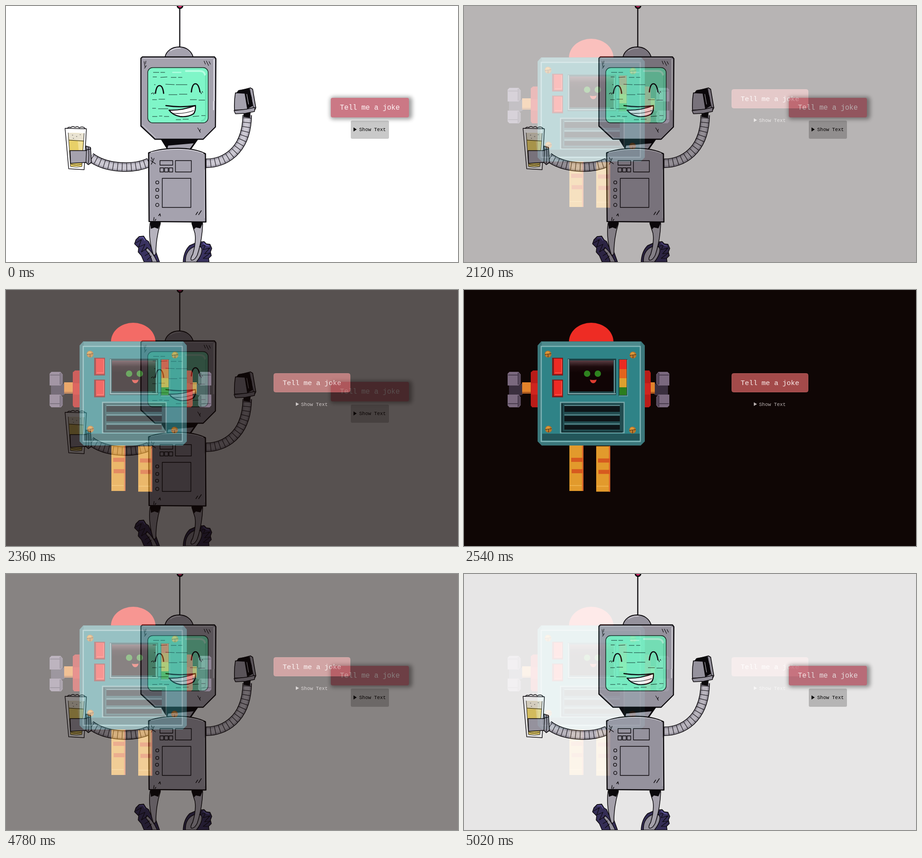
An HTML page that plays this animation: 995x563 px, repeating every 5.08 s.

```html
<!DOCTYPE html>
<html lang="en">
<head>
<meta charset="utf-8">
<title>Joke robots</title>
<style>
  html, body { margin: 0; width: 100%; height: 100%; overflow: hidden; background: #fff; }
  svg { display: block; width: 995px; height: 563px; }
  text { font-family: "Courier New", "Liberation Mono", monospace; text-anchor: middle; }

  /* Ten-percent fade steps of 60 ms, with a long hold at each end. */
  .night { animation: fade 5080ms infinite; }
  @keyframes fade {
    0%      { opacity: 0; animation-timing-function: step-end; }
    39.37%  { opacity: 0; animation-timing-function: steps(10, start); }
    51.181% { opacity: 1; animation-timing-function: step-end; }
    89.37%  { opacity: 1; animation-timing-function: steps(9, start); }
    100%    { opacity: .1; }
  }

  .ink { fill: none; stroke: #0b090d; stroke-linecap: round; stroke-linejoin: round; }
  .metal { fill: #a5a2ae; stroke: #0b090d; stroke-linejoin: round; }
  .shine { fill: none; stroke: #e3e1e9; stroke-linecap: round; }
</style>
</head>
<body>
<svg viewBox="0 0 995 563">
  <defs>
    <filter id="shadow" x="-20%" y="-60%" width="140%" height="220%"><feGaussianBlur stdDeviation="5"/></filter>
    <filter id="soft" x="0" y="0" width="995" height="563" filterUnits="userSpaceOnUse"><feGaussianBlur stdDeviation=".7"/></filter>
    <filter id="smooth" x="0" y="0" width="995" height="563" filterUnits="userSpaceOnUse"><feGaussianBlur stdDeviation=".45"/></filter>
    <linearGradient id="glare" x2="0" y2="1">
      <stop offset="0" stop-color="#5a3d43"/><stop offset=".2" stop-color="#1d0b0d"/><stop offset=".4" stop-color="#100405"/>
    </linearGradient>
    <g id="arms" fill="none">
      <path d="M315 344C280 360 220 358 186 332"/>
      <path d="M440 346C480 346 530 320 531 240"/>
    </g>
    <g id="screw">
      <circle r="7.5" fill="#b9752a"/><circle cx="-1" cy="-1.5" r="4.5" fill="#dc9838"/>
      <path d="M-7 1L7 -1M0 0V7" stroke="#5e3a18" stroke-width="1.6"/>
    </g>
    <g id="claw">
      <path d="M99 208H124L129 204V230L124 232H99Z" fill="#3b2f3f"/>
      <path d="M100 180H120L125 186V206L120 210H96V184Z" fill="#7b697f"/>
      <path d="M96 230H120L125 236V253L121 258H100L96 254Z" fill="#7b697f"/>
      <path d="M119 182V208M119 232V257M97 187H119M97 250H119" stroke="#493b4e" stroke-width="2"/>
      <path d="M120 181L125 187V206L120 209ZM120 231L125 237V252L120 257Z" fill="#594a5d"/>
    </g>
    <g id="leg">
      <path d="M0 0H31V100H0Z" fill="#e29a2c"/>
      <path d="M28 0H31V100H28Z" fill="#d9652a"/>
      <path d="M4 27H31V36H4ZM5 52H31V61H5Z" fill="#d75a1f"/>
      <path d="M1 88H27" stroke="#eeb14a" stroke-width="2"/>
    </g>
    <g id="lamp">
      <path d="M0 0H24V39H0Z" fill="#7c1c1b"/><path d="M4 2H22V36H4Z" fill="#ee2a24"/>
      <path d="M6 33H21V4" fill="none" stroke="#ff5a4c" stroke-width="1.5"/>
    </g>
  </defs>

  <g class="day">
    <rect width="995" height="563" fill="#fff"/>
    <g filter="url(#smooth)">

      <!-- antenna and dome -->
      <path class="ink" d="M382.5 4V91" stroke-width="2.4"/>
      <circle cx="383" cy="-1" r="7.5" fill="#0b090d"/><circle cx="383" cy="-1" r="4.5" fill="#d8276b"/>
      <path class="metal" d="M350 112C353 99 365 90 381 90S408 99 412 112Z" stroke-width="1.8"/>
      <path class="shine" d="M362 99Q371 92 384 93" stroke-width="1.5"/>

      <!-- legs and shoes -->
      <g stroke="#0b090d" stroke-width="1.5" stroke-linejoin="round">
        <path d="M283 523L286 514L293 507L303 506L308 514L314 518L318 528L330 541L338 563H304L298 549L291 541L292 532Z" fill="#39325f"/>
        <path d="M310 531Q323 541 333 563H322Q318 546 308 537Z" fill="#a5a2ae"/>
        <path d="M390 563Q391 540 404 527L420 520L436 518L441 523L449 524L453 533L450 541L452 549L446 555L447 563Z" fill="#39325f"/>
        <path d="M395 563Q394 542 409 532Q425 523 431 533Q433 546 419 563Z" fill="#a5a2ae"/>
        <path d="M317 478H340Q330 509 330 544Q326 553 323 543Q313 510 317 478Z" fill="#b5b2bd"/>
        <path d="M409 478H433Q432 515 421 548Q415 560 408 559Q405 556 411 546Q419 520 416 500Z" fill="#b5b2bd"/>
      </g>
      <path class="ink" d="M286 521L298 514L292 530L306 524L298 541L312 532M306 549L316 543M311 558L320 550M430 522L426 529L439 526L434 536L449 532L437 545L450 543L434 555L446 555" stroke-width="1.2"/>
      <path d="M293 510L302 509L306 516M434 521L440 526L447 528" fill="none" stroke="#675daa" stroke-width="2"/>
      <path d="M317 475H341L335 490L327 487L319 490ZM408 475H434L428 489L418 487L413 492Z" fill="#0b090d"/>

      <!-- arms -->
      <use href="#arms" stroke="#0b090d" stroke-width="20.5"/>
      <use href="#arms" stroke="#a9a6b2" stroke-width="17.5"/>
      <use href="#arms" stroke="#cbc8d2" stroke-width="11"/>
      <use href="#arms" stroke="#2a272e" stroke-width="17.5" stroke-dasharray="1.3 8.7"/>

      <!-- glass and left hand -->
      <path class="ink" d="M135 270Q136 265 143 267Q147 263 152 267Q158 263 161 268Q169 263 175 270" stroke-width="1.4"/>
      <path d="M130 269L177 270L172 360L138 358Z" fill="#fff" stroke="#17151a" stroke-width="1.5" stroke-linejoin="round"/>
      <path d="M137 279L172 280L167 353L142 353Z" fill="#e8d068"/>
      <path d="M137 279L172 280L171 296L139 294Z" fill="#e9e3d2"/>
      <path d="M158 297L169 298L168 318H160Z" fill="#f2e196"/>
      <path class="ink" d="M137 279L142 353Q155 356 167 353L172 280M139 295L171 297M146 284H147M155 287H156M163 283H164M148 291H149M143 348Q155 352 166 348" stroke-width=".9"/>
      <path class="metal" d="M141 318H177L176 308L186 311L188 344L181 349L176 344L142 346Z" stroke-width="1.6"/>
      <path class="ink" d="M177 318L176 345M181 311Q184 328 181 346M176 317L187 314" stroke-width="1.3"/>

      <!-- right hand -->
      <path d="M523 231L539 230L537 246L523 244Z" fill="#0b090d"/>
      <path class="metal" d="M511 187L538 180L543 183L550 224L546 232L529 231Z" stroke-width="1.6"/>
      <path d="M512 185L535 181L541 201L543 220L532 226L525 192L507 191Z" fill="#0b090d"/>
      <path class="ink" d="M536 181Q539 202 545 224" stroke-width="1.3"/>
      <path class="metal" d="M505 191L526 192L532 228L503 229Q502 208 505 191Z" stroke-width="1.6"/>
      <path class="metal" d="M502 230L529 227L548 223L547 232L527 236L505 237Z" stroke-width="1.4"/>
      <path class="shine" d="M530 194L534 216" stroke-width="1"/>

      <!-- neck -->
      <path d="M340 292H424L407 316H355Z" fill="#0b090d"/>
      <path d="M357 307L413 302L404 315H355Z" fill="#a5a2ae"/>

      <!-- body -->
      <path class="metal" d="M314 323Q340 313 378 313Q415 313 439 325L440 475L315 474Z" stroke-width="2.6"/>
      <path class="shine" d="M319 322Q345 315 378 315Q412 315 434 324" stroke-width="1.5"/>
      <path class="shine" d="M437 360V466" stroke-width=".8"/>
      <g class="ink" stroke-width="1.4">
        <rect x="339" y="340" width="28" height="10"/><rect x="373" y="340" width="35" height="25"/>
        <rect x="339" y="356" width="8" height="9"/><rect x="349" y="356" width="8" height="9"/><rect x="359" y="356" width="8" height="9"/>
        <rect x="344" y="379" width="63" height="64"/>
        <circle cx="333" cy="388" r="3.4"/><circle cx="333" cy="404.500" r="3.4"/><circle cx="332.500" cy="419.500" r="3.4"/><circle cx="333" cy="437.500" r="3.6"/>
        <path d="M319 340L329 347M320 348L326 335M322 338L320 333M336 461L339 457L340 462M418 459L422 453M424 459L430 450M325 472L326 465M328 472L330 469"/>
      </g>

      <!-- head -->
      <path class="metal" d="M300 112H459L462 116L461 266L434 293H328L297 264V115Z" stroke-width="2.4"/>
      <path class="shine" d="M302 115H455" stroke-width="1"/>
      <path class="shine" d="M458 118V208M457 210V228" stroke-width="2.5"/>
      <path class="shine" d="M301 262L329 289" stroke-width="1"/>
      <path class="ink" d="M304 122L306 134M308 121L307 127M305 137L309 131M436 121L439 128M441 121L446 131M447 122L450 128M422 268L428 278M428 271L426 276" stroke-width="1.1"/>
      <rect x="312" y="135.500" width="133" height="121.500" rx="11" fill="#7ff6c8" stroke="#14251f" stroke-width="1.5"/>
      <path d="M440 150V240Q440 251 429 253" fill="none" stroke="#6be0b3" stroke-width="3"/>
      <path d="M396 143H427Q436 143 438 151" fill="none" stroke="#b5ffe2" stroke-width="4" stroke-linecap="round"/>
      <path d="M366 146H386" stroke="#b0ffe0" stroke-width="2.5"/>
      <path d="M324 146H337M340 146H350M323 156H332M340 157L355 156M363 157H375M379 157H388M326 173H329M351 172L371 173M374 173H399M322 206H332M336 205H350M358 195H377M381 194H399M405 206H420M424 207H438M322 225H330M335 226H357M322 243H333M337 242H344M348 243H359M411 243L425 242M430 241H439M374 250H385M389 249H402" stroke="#12332a" stroke-width="1.1"/>
      <path class="ink" stroke-width="2.7" d="M329 192Q331 175 338 175T347 192M408 189Q410 171 417 171T427 189"/>
      <path class="ink" stroke-width="1.3" d="M320 193L323 191M325 194L326 191M429 190L430 193M432 188L433 190"/>
      <path d="M359 229Q388 230 417 219Q418 230 413 237Q400 245 383 243Q367 240 359 229Z" fill="#fff" stroke="#0b090d" stroke-width="2.4" stroke-linejoin="round"/>
      <path class="ink" d="M352 219Q384 224 417 219" stroke-width="2.4"/>
      <path class="ink" d="M368 236Q391 238 413 230" stroke-width="1.1"/>
    </g>

    <!-- controls -->
    <rect x="714" y="200" width="180" height="49" rx="6" fill="#000" opacity=".38" filter="url(#shadow)"/>
    <rect x="715" y="202" width="172" height="43" rx="4" fill="#cb7885"/>
    <text x="801" y="228" font-size="15.7" fill="#fff5f6">Tell me a joke</text>
    <rect x="759" y="252" width="84" height="40" rx="3" fill="#000" opacity=".21"/>
    <path d="M765 267L772 271.500L765 276Z"/>
    <text x="807" y="275" font-size="10.9">Show Text</text>
  </g>

  <g class="night">
    <rect width="995" height="563" fill="#0f0605"/>
    <g filter="url(#soft)">
      <!-- arms and legs -->
      <use href="#claw"/><use href="#claw" transform="matrix(-1 0 0 1 548 0)"/>
      <path d="M128 203H148V228H128ZM409 203H420V228H409Z" fill="#e2832b"/>
      <path d="M128 224H148V228H128ZM409 224H420V228H409Z" fill="#ad5b20"/>
      <path d="M147 181L152 177H163V258H150L147 254ZM397 177H408L411 182V254L407 258H397Z" fill="#b91c18"/>
      <path d="M148 205H162V230H148ZM398 205H410V230H398Z" fill="#d0241e"/>
      <use href="#leg" x="232" y="342"/><use href="#leg" x="291" y="343.500"/>

      <!-- case -->
      <path d="M231 114A49 42 0 0 1 329 114Z" fill="#ee2c24"/>
      <path d="M170 113H390L398 122V333L389 342H171L162 333V122Z" fill="#3b777b"/>
      <path d="M171 114H389L388 123H171Z" fill="#4d8a8d"/>
      <rect x="170" y="124" width="218" height="209" fill="#2f8387" stroke="#80b5b7" stroke-width="2.5"/>
      <path d="M172 316H387V331H172Z" fill="#23565a"/>
      <use href="#screw" x="185" y="141"/><use href="#screw" x="372" y="143"/>
      <use href="#screw" x="186" y="306"/><use href="#screw" x="371" y="308"/>
      <use href="#lamp" x="194" y="149"/><use href="#lamp" x="194" y="197"/>

      <!-- face -->
      <path d="M228 151H335V231H228Z" fill="#1a4145"/>
      <path d="M230 152V228H334" fill="none" stroke="#83a9ac" stroke-width="2.5"/>
      <path d="M331 154V226" stroke="#70999c" stroke-width="2"/>
      <path d="M233 155H329V223H233Z" fill="url(#glare)"/>
      <circle cx="271" cy="184" r="7" fill="#2e831f"/><circle cx="294.500" cy="184" r="7" fill="#2e831f"/>
      <path d="M277 197Q284 199 292 197Q290 205 284.500 205T277 197Z" fill="#dc3d31"/>

      <!-- meter -->
      <path d="M340 152H360V233H340Z" fill="#1e4b4e"/>
      <path d="M342 153H358V174H342Z" fill="#ea2b22"/><path d="M342 174H358V194H342Z" fill="#e2631e"/>
      <path d="M342 194H358V214H342Z" fill="#dda02e"/><path d="M342 214H358V231H342Z" fill="#2b7d1d"/>
      <path d="M360 153V233H341" fill="none" stroke="#7aa9a9" stroke-width="1.3"/>

      <!-- grille -->
      <rect x="212.500" y="247" width="140" height="67" fill="#214c50" stroke="#78a9ab" stroke-width="2.5"/>
      <path d="M216 250V312H349" fill="none" stroke="#123034" stroke-width="3"/>
      <path d="M221 255H343V268H221ZM221 277H343V289H221ZM221 297H343V307H221Z" fill="#0e1518"/>
      <path d="M221 254H343M221 274.500H343M221 294.500H343" stroke="#618f93" stroke-width="2"/>
    </g>

    <!-- controls -->
    <rect x="589.500" y="183.500" width="168" height="41" rx="4" fill="#a34a4a" stroke="#ad5857"/>
    <text x="673.500" y="209" font-size="15.35" fill="#fbeeec">Tell me a joke</text>
    <path d="M638 247L645 251L638 255Z" fill="#b9b0af"/>
    <text x="679" y="255" font-size="10.9" fill="#b9b0af">Show Text</text>
  </g>
</svg>
</body>
</html>
```
